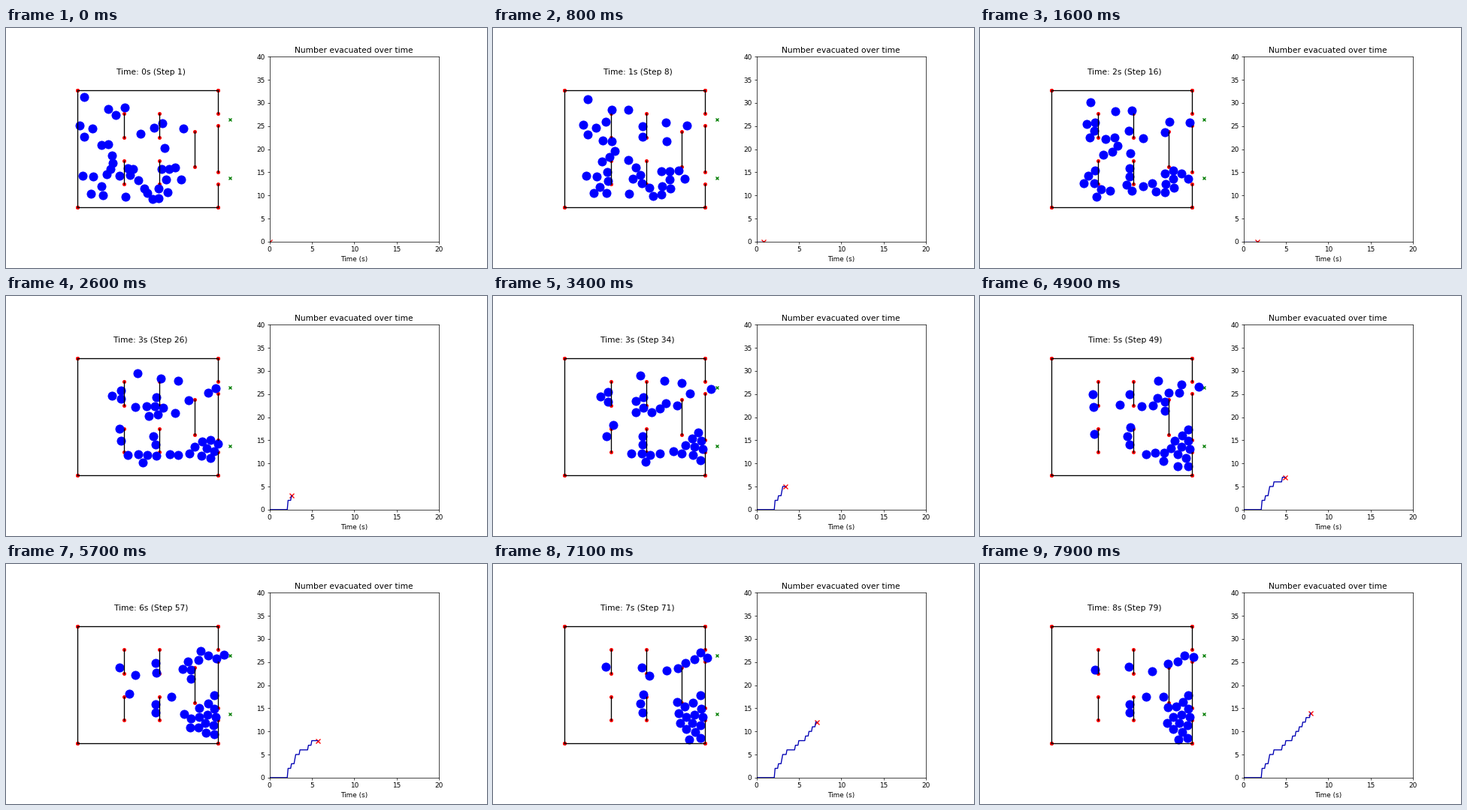
Write a matplotlib script that moves like this. It is 640 by 320 pixels and loops after 8000 ms.

```python
import numpy as np
import matplotlib.pyplot as plt
from matplotlib.animation import FuncAnimation

plt.rcParams["font.family"] = "DejaVu Sans"

FRAMES, DT = 80, 0.1
UNIT, X0, Y0 = 15.58, 95.0, 239.1    # room scale and origin in pixels
SPEED = 2.75                         # pixels per frame
SPACING, WALL_GAP, DOOR_REACH = 11, 4.5, 4.6


def room(x, y):
    """Room units to stage pixels, as a complex number."""
    return X0 + UNIT * x + 1j * (Y0 - UNIT * y)


def wall(x1, y1, x2, y2):
    return room(x1, y1), room(x2, y2)


WALLS = [
    wall(0, 0, 0, 10), wall(0, 10, 12, 10), wall(0, 0, 12, 0),
    wall(12, 10, 12, 8), wall(12, 7, 12, 3), wall(12, 2, 12, 0),
    wall(10, 6.5, 10, 3.5),
] + [wall(x, y, x, y + 2) for x in (4, 7) for y in (2, 6)]
DOORS = np.array([room(13, 7.5), room(13, 2.5)])

# Where the walkers stand at the beginning, in pixels
START = np.array([
    (104, 92), (136, 108), (146, 116), (158, 106), (98, 130), (115, 134), (104, 145), (127, 156),
    (136, 155), (141, 170), (142, 180), (139, 188), (134, 195), (102, 197), (116, 198), (127, 211),
    (113, 221), (129, 223), (151, 197), (162, 187), (169, 188), (165, 196), (176, 203), (184, 214),
    (188, 220), (195, 228), (203, 227), (203, 214), (215, 219), (213, 202), (233, 202), (207, 188),
    (217, 188), (225, 186), (211, 160), (179, 141), (197, 133), (208, 127), (236, 134), (159, 225),
]) @ [1, 1j]


# Crowd --------------------------------------------------------------------
def wall_dist(p):
    a, b = np.array(WALLS).T
    d = b - a
    t = np.clip(((p - a) * d.conj()).real / abs(d) ** 2, 0, 1)
    return abs(p - a - t * d)


def is_free(p, q, others):
    """A step from p to q must not press closer to a wall or a neighbour."""
    return (np.all(abs(others - q) >= np.minimum(SPACING, abs(others - p)))
            and np.all(wall_dist(q) >= np.minimum(WALL_GAP, wall_dist(p))))


def choose_doors(pos):
    """Each walker takes the door with the shortest way plus queue."""
    dist = abs(pos[:, None] - DOORS)
    choice, queue = np.zeros(len(pos), int), np.zeros(2)
    for i in dist.min(axis=1).argsort():
        choice[i] = (dist[i] + 2 * queue).argmin()
        queue[choice[i]] += 1
    return DOORS[choice]


def simulate():
    rng = np.random.default_rng(7)
    pos = START.copy()
    goal = choose_doors(pos)
    side = rng.choice([-1, 1], len(pos))
    turns = np.radians(np.arange(0, 76, 15))
    history = [pos.copy()]
    for _ in range(1, FRAMES):
        for i in abs(goal - pos).argsort():
            p = pos[i]
            if np.isnan(p):
                continue
            inside = ~np.isnan(pos)
            inside[i] = False
            others = pos[inside]
            ahead = SPEED * (goal[i] - p) / abs(goal[i] - p)
            # Straight on, then ever wider turns, at last a step aside and back
            angles = [s * t for t in turns for s in (side[i], -side[i])]
            angles.append(side[i] * rng.uniform(np.pi / 2, np.pi))
            for angle in angles:
                q = p + ahead * np.exp(1j * angle)
                if is_free(p, q, others):
                    pos[i] = q
                    break
            if abs(goal[i] - pos[i]) < DOOR_REACH:
                pos[i] = np.nan
        history.append(pos.copy())
    return np.array(history)


tracks = simulate()
times = np.arange(FRAMES) * DT
counts = np.isnan(tracks).sum(axis=1)

# Room ---------------------------------------------------------------------
fig = plt.figure(figsize=(10, 5), dpi=64, facecolor="white")
plan = fig.add_axes([0, 0, 1, 1])
plan.set(xlim=(0, 640), ylim=(320, 0))
plan.axis("off")

for ends in np.array(WALLS):
    plan.plot(ends.real, ends.imag, "o", color="red", ms=4.6, mew=1, zorder=1)
    plan.plot(ends.real, ends.imag, "k-", lw=1.5, zorder=3)
plan.plot(DOORS.real, DOORS.imag, "x", color="green", ms=4.2, mew=1.5, zorder=1)

dots, = plan.plot([], [], "o", color="blue", ms=12.5, mew=1, zorder=2)
clock = plan.text(192.7, 62.2, "", fontsize=12, ha="center", va="baseline")

# Chart --------------------------------------------------------------------
width = 0.775 / 2.2
chart = fig.add_axes([0.9 - width, 0.11, width, 0.77])
chart.set(xlim=(0, 20), ylim=(0, 40), xticks=range(0, 21, 5), yticks=range(0, 41, 5))
chart.set_title("Number evacuated over time", fontsize=12)
chart.set_xlabel("Time (s)", fontsize=10)
curve, = chart.plot([], [], color="#0000b4", lw=1.5)
tip, = chart.plot([], [], "x", color="red", ms=6, mew=1.5, zorder=1)


def update(f):
    dots.set_data(tracks[f].real, tracks[f].imag)
    clock.set_text(f"Time: {times[f]:.0f}s (Step {max(1, f)})")
    curve.set_data(times[:f + 1], counts[:f + 1])
    tip.set_data([times[f]], [counts[f]])
    return dots, clock, curve, tip


anim = FuncAnimation(fig, update, frames=FRAMES, interval=1000 * DT, repeat=True, repeat_delay=0)
plt.show()
```
